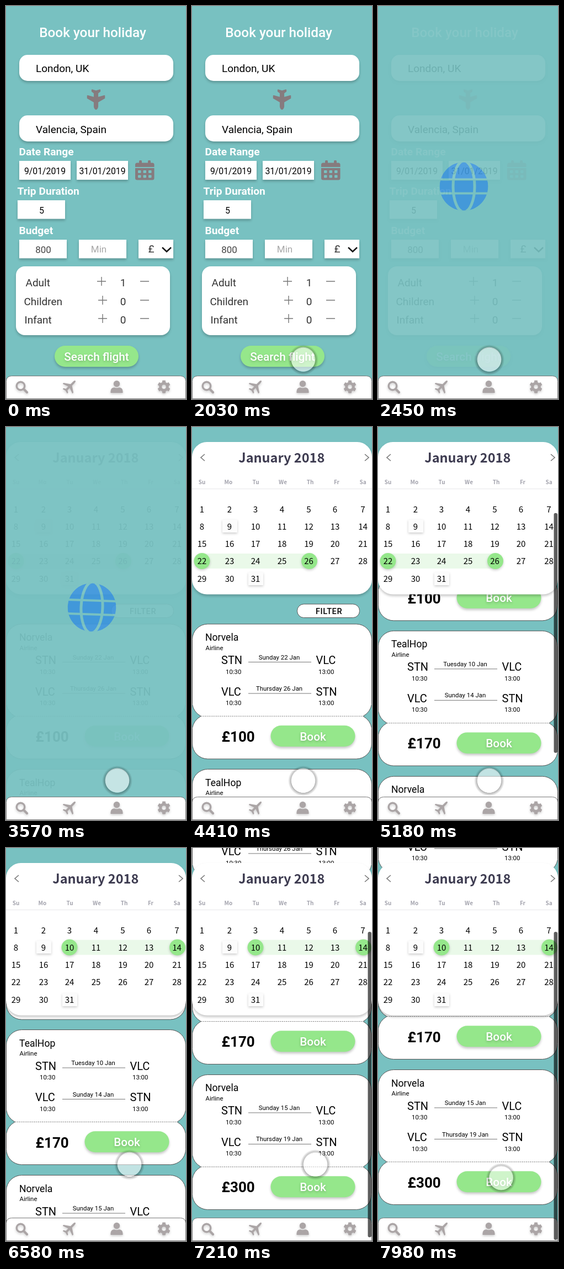
An HTML page for the animation above (8000 ms loop, 326 px wide and 708 px high).

```html
<!DOCTYPE html>
<html lang="en">
<head>
<meta charset="utf-8">
<title>Holiday booking</title>
<style>
  html, body { margin: 0; width: 100%; height: 100%; overflow: hidden; background: #78c1c1; }
  svg { display: block; width: 100%; height: 100%; font-family: Roboto, sans-serif; }
  .cal { font-family: "Noto Sans CJK JP", "Noto Sans CJK SC", "Noto Sans CJK", "Noto Sans", sans-serif; }
  .mid { text-anchor: middle; }
  .med { font-weight: 500; }
  .bold { font-weight: 700; }
  .lift { filter: drop-shadow(0 3px 2px rgba(0, 0, 0, .22)); }
  .soft { filter: drop-shadow(0 2px 2px rgba(0, 0, 0, .2)); }
</style>
</head>
<body>
<svg id="stage" viewBox="0 0 326 708" xmlns="http://www.w3.org/2000/svg"></svg>
<script>
const TEAL = '#78c1c1', GREEN = '#95e78b', DARK = '#867b7e', ICON = '#aba5a6';
const LOOP = 8000;

const rect = (x, y, w, h, r = 0, fill = '#fff', extra = '') =>
  `<rect x="${x}" y="${y}" width="${w}" height="${h}" rx="${r}" fill="${fill}" ${extra}/>`;
const text = (s, x, y, size, cls = '', fill = '#000', extra = '') =>
  `<text x="${x}" y="${y}" font-size="${size}" class="${cls}" fill="${fill}" ${extra}>${s}</text>`;
const line = (d, stroke, width = 1, extra = '') =>
  `<path d="${d}" fill="none" stroke="${stroke}" stroke-width="${width}" ${extra}/>`;
const group = (body, attrs = '') => `<g ${attrs}>${body}</g>`;

const plane = () =>
  `<path transform="translate(163 168.5) rotate(90) scale(.0635) translate(-288 -256)" fill="${DARK}"
    d="M480 192H366L261 8Q256 0 247 0H181Q163 2 166 20L215 192H112L69 134Q64 128 56 128H16Q-2 130 0 148L32 256
    L0 364Q-2 382 16 384H56Q64 384 69 378L112 320H215L166 492Q163 510 181 512H247Q256 512 261 504L366 320H480
    C515 320 576 291 576 256S515 192 480 192Z"/>`;

const slimPlane = () =>
  `<path transform="translate(114.5 686.5) scale(.0165 -.0165) translate(-700 -690)" fill="${ICON}"
    d="M1397 1324q0-87-149-236l-240-240l143-746q2-18-8-29l-64-64q-36-24-52 9l-274 575l-245-245q68-238 68-252
    t-9-23l-64-64q-30-22-51 7l-155 280l-280 155q-32 22-8 51l64 65q9 9 23 9t252-68l245 245l-575 274
    q-32 20-9 52l64 64q12 11 29 8l746-143l240 240q149 149 236 149q73-6 73-73z"/>`;

const pill = (s, x, y, w) =>
  rect(x, y, w, 38, 19, GREEN, 'class="lift"') +
  text(s, x + w / 2, y + 26.7, 20.75, 'mid med soft', '#fff');

function calendarIcon() {
  let holes = '';
  for (let r = 0; r < 2; r++)
    for (let c = 0; c < 3; c++) holes += rect(239 + 9.5 * c, 296 + 8.5 * r, 5.5, 5, 1, TEAL);
  return rect(241, 278, 5, 8, 1.5, DARK) + rect(257, 278, 5, 8, 1.5, DARK) +
    `<path d="M234 290V286Q234 282.5 237.5 282.5H265Q268.5 282.5 268.5 286V290Z" fill="${DARK}"/>` +
    `<path d="M234 292H268.5V310Q268.5 313.5 265 313.5H237.5Q234 313.5 234 310Z" fill="${DARK}"/>` + holes;
}

function counter(label, x, y, value, px) {
  return text(label, x, y + 9, 19, '', '#333') + text(value, 212, y + 9, 19, 'mid', '#333') +
    line(`M${px - 8} ${y}h16M${px} ${y - 8}v16M243 ${y}h16`, '#777', 1.4);
}

function form() {
  const boxes = [[24, 279, 93, 34], [128, 279, 93, 34], [21, 350, 86, 33.5],
    [24, 421, 86, 33.5], [132, 421, 86, 33.5], [240, 421, 63, 33.5]];
  return rect(0, 0, 326, 708, 0, TEAL) +
    text('Book your holiday', 157, 55.5, 24.3, 'mid med', '#fff') +
    group(rect(24, 88, 279, 47, 15) + rect(24, 197, 279, 47, 15) +
      boxes.map(b => rect(...b)).join('') + rect(18, 469, 279, 124, 16), 'class="lift"') +
    text('London, UK', 54, 119, 19) + text('Valencia, Spain', 54, 229, 19) +
    plane() + calendarIcon() +
    text('Date Range', 23.5, 269, 19.2, 'bold', '#fff') +
    text('Trip Duration', 20.5, 340, 19.2, 'bold', '#fff') +
    text('Budget', 23.5, 411, 19.2, 'bold', '#fff') +
    text('9/01/2019', 70.5, 303, 15.8, 'mid') + text('31/01/2019', 174.5, 303, 15.8, 'mid') +
    text('5', 64.5, 373.5, 16, 'mid') + text('800', 67.5, 445, 17, 'mid', '#444') +
    text('Min', 168, 444, 17, 'mid', '#a8a8a8') + text('£', 263, 444, 19, 'mid', '#333') +
    line('M283 435l8 7.5l8-7.5', '#111', 2.4) +
    counter('Adult', 35.5, 496, 1, 173) + counter('Children', 32.5, 530, 0, 175) +
    counter('Infant', 33.5, 563, 0, 175) +
    pill('Search flight', 88, 612, 152);
}

function globe() {
  return `<clipPath id="disc"><circle r="44"/></clipPath>` +
    group(`<circle r="44" fill="#3f96dc"/>` +
      line('M-46 -12.5H46M-46 12.5H46', TEAL, 4) +
      `<ellipse rx="19.5" ry="46" fill="none" stroke="${TEAL}" stroke-width="5"/>`,
      'id="globe" clip-path="url(#disc)"');
}

const leg = (from, to, date, y) =>
  text(from, 53, y, 20) + text(to, 224.5, y, 20) +
  text('10:30', 61, y + 17.5, 11.4) + text('13:00', 229, y + 17.5, 11.4) +
  text(date, 158, y - 8.5, 11.4, 'mid') + line(`M102 ${y - 3.5}H216`, '#777');

function card(y, airline, out, back, price) {
  const outline = 'M.5 28A28 28 0 0 1 28.5 .5H297.5A28 28 0 0 1 325.5 28V145Q323 159 310 166.5' +
    'Q323 174 325.5 188V215.5A28 28 0 0 1 297.5 243.5H28.5A28 28 0 0 1 .5 215.5V188Q3 174 16 166.5Q3 159 .5 145Z';
  return group(
    `<path d="${outline}" fill="#fff" stroke="#555"/>` +
    line('M16 166.5H310', '#777', 1, 'stroke-dasharray="2 1.5"') +
    text(airline, 24, 30.5, 17.6) + text('Airline', 24.5, 47, 11.4) +
    leg('STN', 'VLC', out, 72.5) + leg('VLC', 'STN', back, 129) +
    text('£' + price, 53.5, 212.5, 26, 'bold') + pill('Book', 142.5, 183.3, 153),
    `transform="translate(0 ${y})"`);
}

const COLS = [18, 68, 115, 163, 211.5, 259, 309.5];
const ROWS = [148, 179, 210, 241.5, 273];

function range(id, row, from, to) {
  const y = ROWS[row], x1 = COLS[from], x2 = COLS[to] + 1;
  const dot = x => `<circle cx="${x}" cy="${y}" r="14.5" fill="${GREEN}" class="soft"/>`;
  return group(rect(x1, y - 13.5, x2 - x1, 27, 0, '#eaf9e9') + dot(x1) + dot(x2), `id="${id}"`);
}

function calendar() {
  const names = ['Su', 'Mo', 'Tu', 'We', 'Th', 'Fr', 'Sa'];
  const nameX = [18, 66, 115.5, 164.5, 214, 262, 309.5];
  let days = '';
  for (let d = 1; d <= 31; d++)
    days += text(d, COLS[(d - 1) % 7], ROWS[Math.floor((d - 1) / 7)] + 5.5, 15, 'mid');
  return rect(0, 27, 326, 274.5, 27, '#fff', 'class="lift"') +
    group(
      text('January 2018', 162.3, 63.5, 23.5, 'mid bold', '#3d3b50') +
      line('M23 49l-7 6l7 6M313 49l7 6l-7 6', '#777', 1.6) +
      names.map((n, i) => text(n, nameX[i], 103, 10, 'mid bold', '#a3a3ad')).join('') +
      line('M0 111.5H326', '#e6e6ea') +
      range('first', 3, 0, 4) + range('second', 1, 2, 6) +
      group(rect(55, 167, 27, 23, 0, '#fcfcfc') + rect(102, 262, 27, 23, 0, '#fcfcfc'), 'class="soft"') + days,
      'class="cal"');
}

function results() {
  const filter = rect(190.5, 319, 113, 24.5, 12, '#fff', 'stroke="#555"') +
    text('FILTER', 248, 336.5, 14.5, 'mid med', '#000', 'letter-spacing=".6"');
  return rect(0, 0, 326, 708, 0, TEAL) +
    group(filter +
      card(354.5, 'Norvela', 'Sunday 22 Jan', 'Thursday 26 Jan', 100) +
      card(616, 'TealHop', 'Tuesday 10 Jan', 'Sunday 14 Jan', 170) +
      card(878, 'Norvela', 'Sunday 15 Jan', 'Thursday 19 Jan', 300), 'id="list"') +
    calendar();
}

function nav() {
  let teeth = '';
  for (let a = 0; a < 360; a += 60) teeth += rect(-3, -11.5, 6, 6, 1, ICON, `transform="rotate(${a})"`);
  return '<path d="M.5 707.5V676.5Q.5 666.5 10.5 666.5H315.5Q325.5 666.5 325.5 676.5V707.5Z" fill="#fff" stroke="#777"/>' +
    group(
      `<circle cx="26.5" cy="684.5" r="7.3" fill="none" stroke="${ICON}" stroke-width="3.4"/>` +
      line('M32 690l6 6', ICON, 4.2, 'stroke-linecap="round"') +
      slimPlane() +
      `<circle cx="200.5" cy="680.5" r="5.7" fill="${ICON}"/>` +
      `<path d="M189.5 697V694Q190 687.5 196 687.3Q200.5 689 205 687.3Q211 687.5 211.5 694V697Z" fill="${ICON}"/>` +
      group(teeth + `<circle r="6.3" fill="none" stroke="${ICON}" stroke-width="5"/>`, 'transform="translate(286 686)"'),
      'class="soft"');
}

// The shadow is a ring, so that the see-through disc stays clean.
const cursor = () =>
  `<radialGradient id="ring"><stop offset=".77" stop-opacity="0"/><stop offset=".79" stop-opacity=".3"/>
    <stop offset="1" stop-opacity="0"/></radialGradient>` +
  group('<circle cy="1" r="27.5" fill="url(#ring)"/><circle r="22" fill="#fff" fill-opacity=".55"/>', 'id="cursor"');

document.getElementById('stage').innerHTML =
  rect(0, 0, 326, 708, 0, TEAL) +
  group(globe(), 'transform="translate(155.5 325)"') +
  group(form(), 'id="form"') + group(results(), 'id="results"') + nav() +
  rect(318.5, 0, 6.5, 10, 3, '#000', 'id="thumb"') + cursor();

const $ = id => document.getElementById(id);
const ui = Object.fromEntries(
  ['form', 'results', 'globe', 'list', 'first', 'second', 'thumb', 'cursor'].map(id => [id, $(id)]));
const set = (el, attrs) => { for (const k in attrs) el.setAttribute(k, attrs[k]); };

const phase = (t, a, b) => Math.min(1, Math.max(0, (t - a) / (b - a)));
const out = p => 1 - (1 - p) ** 3;
const smooth = p => p * p * (3 - 2 * p);
const show = (el, o) => set(el, { opacity: o, visibility: o > 0 ? 'visible' : 'hidden' });

// Cursor stops: start, end, x, y
const MOVES = [[1150, 1650, 201.5, 636.5], [5450, 5850, 223.5, 569.5], [7450, 7850, 223, 594]];

function cursorAt(t) {
  let x = 350, y = 480;
  for (const [a, b, tx, ty] of MOVES) {
    const p = smooth(phase(t, a, b));
    x += (tx - x) * p;
    y += (ty - y) * p;
  }
  return [x, y];
}

function draw(t) {
  show(ui.form, 1 - smooth(phase(t, 2140, 2520)));
  show(ui.results, smooth(phase(t, 3510, 3980)));
  set(ui.globe, { transform: `rotate(${362 * smooth(phase(t, 2480, 3560))})` });

  const scroll = 289 * out(phase(t, 4500, 5909)) + 190 * out(phase(t, 6700, 7500));
  set(ui.list, { transform: `translate(0 ${-scroll})` });

  const second = t >= 6600;
  const top = second ? 151 : 25 + .522 * scroll;
  const bottom = second ? 706 - .522 * (479 - scroll) : top + 432;
  const seen = second ? phase(t, 6680, 6780) : phase(t, 4480, 4570) * (1 - phase(t, 5900, 6150));
  set(ui.thumb, { y: top, height: bottom - top });
  show(ui.thumb, .64 * seen);

  const swap = smooth(phase(t, 5950, 6250));
  show(ui.first, 1 - swap);
  show(ui.second, swap);

  const [x, y] = cursorAt(t);
  set(ui.cursor, { transform: `translate(${x} ${y})` });
  show(ui.cursor, t < 1150 ? 0 : 1);
}

function tick() {
  draw(performance.now() % LOOP);
  requestAnimationFrame(tick);
}
tick();
</script>
</body>
</html>
```
